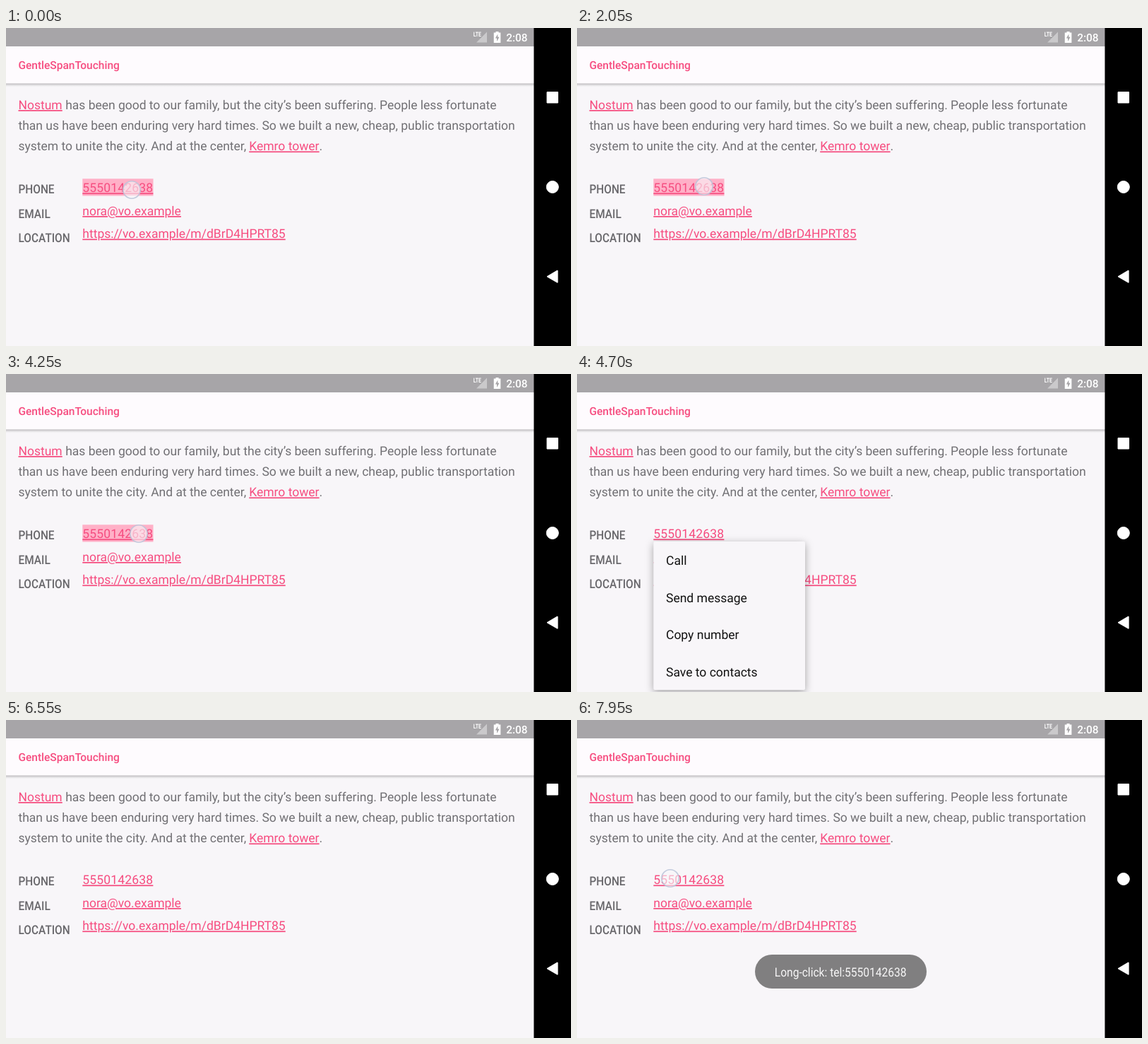
Animation of 800 by 450 pixels, one loop 8000 ms. Source, as an HTML page:

```html
<!DOCTYPE html>
<html lang="en">
<head>
<meta charset="utf-8">
<title>Link touch demo</title>
<style>
  html, body { margin: 0; width: 100%; height: 100%; overflow: hidden; }
  svg { display: block; width: 800px; height: 450px; }
  text { font: 17.5px Roboto, sans-serif; text-rendering: geometricPrecision; fill: #717074; white-space: pre; }
  .story { letter-spacing: -.022px; }
  .link {
    fill: #f64d80; text-decoration: underline; text-decoration-skip-ink: none;
    text-decoration-thickness: 1.2px; text-underline-offset: 1.9px;
  }
  .digits { letter-spacing: .17px; }
  .title { font-size: 15.5px; font-weight: 500; fill: #f64d80; }
  .label { font-weight: 500; fill: #68676b; }
  .status { font-size: 15.3px; font-weight: 500; fill: #fff; }
  .network { font-size: 9px; font-weight: 700; fill: #fff; }
  #menu text { fill: #111; }
  #menu rect { filter: drop-shadow(0 3px 6px rgba(0, 0, 0, .34)); }
  #toast text { fill: #f6f6f6; }
</style>
</head>
<body>
<svg viewBox="0 0 800 450">
  <defs>
    <linearGradient id="shade" x2="0" y2="1">
      <stop stop-opacity=".27"/><stop offset=".4" stop-opacity=".12"/><stop offset="1" stop-opacity="0"/>
    </linearGradient>
    <clipPath id="reveal"><rect id="revealBox" x="80" y="210" width="290" height="240"/></clipPath>
  </defs>

  <rect width="800" height="450" fill="#f8f6f9"/>
  <rect y="26" width="748" height="53" fill="#fefbfe"/>
  <rect y="78.5" width="748" height="4.5" fill="url(#shade)"/>
  <rect width="748" height="26" fill="#a7a5a8"/>

  <text class="network" transform="translate(661.8 12) scale(.76 1)">LTE</text>
  <path d="M666 20.5H681V5.5Z" fill="#fff" opacity=".4"/>
  <path d="M693.5 5h4v1.6h2.8V21h-9.6V6.6h2.8Z" fill="#fff"/>
  <path d="M696.3 8.5L692.8 14.6H695V19L698.5 12.8H696.3Z" fill="#a7a5a8"/>
  <text class="status" x="708.3" y="19.3">2:08</text>

  <rect x="747.4" width="52.6" height="450"/>
  <g fill="#fff" stroke="#fff" stroke-linejoin="round">
    <rect x="766" y="90.6" width="15.5" height="15.4" stroke-width="1"/>
    <circle cx="773.8" cy="225" r="8.5" stroke-width="1"/>
    <path d="M766.8 351.7L780.7 343.6V359.8Z" stroke-width="1.8"/>
  </g>

  <text class="title" x="17.4" y="58.2">GentleSpanTouching</text>
  <text class="link" x="17.5" y="115">Nostum</text>
  <text class="story" x="84.2" y="115">has been good to our family, but the city’s been suffering. People less fortunate</text>
  <text class="story" x="17.5" y="144.2">than us have been enduring very hard times. So we built a new, cheap, public transportation</text>
  <text class="story" x="17.5" y="173.4">system to unite the city. And at the center,</text>
  <text class="link" x="344.2" y="173.4">Kemro tower</text>
  <text x="443.6" y="173.4">.</text>

  <text class="label" transform="translate(17.5 234.3) scale(.88 1)">PHONE</text>
  <text class="label" transform="translate(17.5 268.8) scale(.88 1)">EMAIL</text>
  <text class="label" transform="translate(17.5 303.3) scale(.88 1)">LOCATION</text>
  <rect id="highlight" x="108.3" y="213.3" width="100.2" height="24.2" fill="#ffb0c7"/>
  <text class="link digits" x="108.3" y="232.4">5550142638</text>
  <text class="link" x="108.3" y="265">nora@vo.example</text>
  <text class="link" x="108.3" y="297.4">https://vo.example/m/dBrD4HPRT85</text>

  <g id="menu" clip-path="url(#reveal)">
    <rect x="108.3" y="237" width="214.7" height="210" rx="2" fill="#f8f6f9"/>
    <text x="126" y="270">Call</text>
    <text x="126" y="322.5">Send message</text>
    <text x="126" y="375">Copy number</text>
    <text x="126" y="427.5">Save to contacts</text>
  </g>

  <g id="toast">
    <rect x="252" y="332" width="243" height="48" rx="24" fill="#807f80"/>
    <text transform="translate(279.8 362.6) scale(.89 1)">Long-click: tel:5550142638</text>
  </g>

  <circle id="touch" r="12.2" fill="#f8f6f9" fill-opacity=".6" stroke="#b9c3d8" stroke-opacity=".85" stroke-width="1.6"/>
</svg>
<script>
const LOOP = 8000, STEP = 50, FADE = 200, LONG_PRESS = 7600;
const LINK_TOP = 213, LINK_BOTTOM = 238;

// Each press: time down, time up, path of [time, x, y].
const presses = [
  { down: 0, up: 200, path: [[0, 178, 229]] },
  { down: 650, up: 2900, path: [
    [650, 178, 229], [900, 173, 192], [1050, 174, 207], [1450, 177, 248], [1650, 182, 262],
    [1750, 182, 262], [2050, 180, 224], [2150, 181, 215.5], [2250, 181, 215.5],
    [2300, 179, 215], [2450, 179, 215], [2750, 182, 202]] },
  { down: 4250, up: 4350, path: [[4250, 188, 226]] },
  { down: 6200, up: 6250, path: [[6200, 321, 200]] },
  { down: 7200, up: LOOP, path: [[7200, 132, 224]] }
];

const el = id => document.getElementById(id);
const clamp = v => Math.min(1, Math.max(0, v));
const ramp = (t, from, to) => clamp((t - from) / (to - from));
const easeOut = v => 1 - (1 - v) ** 2;
const smooth = v => v * v * (3 - 2 * v);

function locate(path, t) {
  const next = path.findIndex(key => key[0] > t);
  if (next < 1) return path.at(-1).slice(1);
  const [t0, x0, y0] = path[next - 1], [t1, x1, y1] = path[next];
  const k = smooth(ramp(t, t0, t1));
  return [x0 + (x1 - x0) * k, y0 + (y1 - y0) * k];
}

function draw(t) {
  const press = presses.findLast(p => p.down <= t);
  const [x, y] = locate(press.path, t);
  const touch = el('touch');
  touch.setAttribute('cx', x);
  touch.setAttribute('cy', y);
  touch.setAttribute('opacity', 1 - ramp(t, press.up, press.up + FADE));

  const onLink = t <= press.up && t < LONG_PRESS && y >= LINK_TOP && y <= LINK_BOTTOM;
  el('highlight').setAttribute('opacity', +onLink);

  const opening = easeOut(ramp(t, 4400, 4700));
  el('menu').setAttribute('opacity', opening * (1 - ramp(t, 6250, 6500)));
  el('revealBox').setAttribute('height', 80 + 160 * opening);
  el('toast').setAttribute('opacity', ramp(t, 7550, 7900));
}

function tick() {
  draw(Math.floor(performance.now() % LOOP / STEP) * STEP);
  requestAnimationFrame(tick);
}
tick();
</script>
</body>
</html>
```
